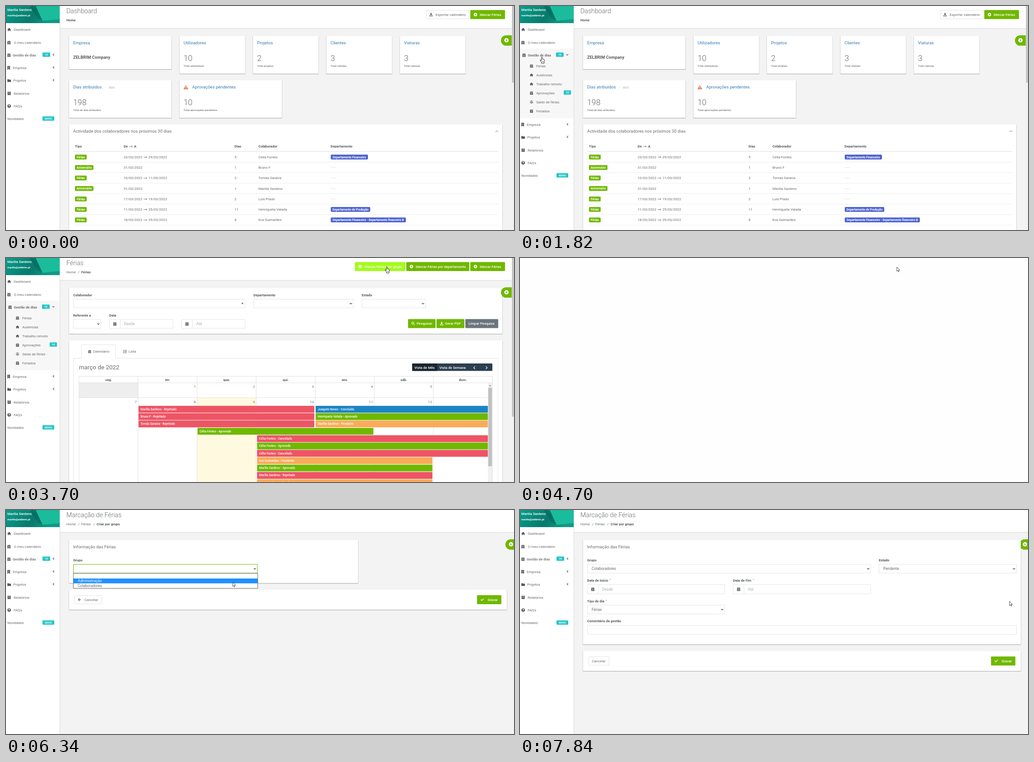
An HTML page for the animation above (8 s loop, 1127x497 px).

```html
<!DOCTYPE html>
<html lang="pt">
<head>
<meta charset="utf-8">
<title>Dashboard</title>
<style>
html, body { margin: 0; width: 100%; height: 100%; overflow: hidden; background: #fff; }
svg { display: block; width: 100vw; height: 100vh; font-family: Roboto, sans-serif; }
text { white-space: pre; }
.bare text, .bare .ic { visibility: hidden; }
</style>
</head>
<body>
<svg id="stage" viewBox="0 0 1127 497"></svg>
<script>
const LOOP = 8000;
const GREEN = '#70b800', TEAL = '#23c6c8', GREY = '#676a6c', DARK = '#55585a', LINE = '#e2e4e6';
const RED = '#ed5565', BLUE = '#1c84c6', ORANGE = '#f8ac59', INDIGO = '#4a61cf';
const WHO = {
  me: 'Marília Sardeno', a: 'Célia Fontes', b: 'Bruno F', c: 'Tomás Saraiva',
  d: 'Luís Prado', e: 'Henriqueta Valada', f: 'Eva Guimarães', g: 'Joaquim Neves'
};

const ICONS = {
  home: 'M8 1L0 8l1 1 1-.8V15h4.5v-4h3v4H14V8.2l1 .8 1-1z',
  cal: 'M1 2h3V0h2v2h4V0h2v2h3v3H1zM1 6h14v10H1zM4 8v2h3V8zM9 8v2h3V8zM4 12v2h3v-2zM9 12v2h3v-2z',
  plan: 'M1 2h3V0h2v2h4V0h2v2h3v3H1zM1 6h14v10H1zM4 9v2h8V9z',
  build: 'M2 0h12v16h-4v-3H6v3H2zM5 3v2h2V3zM9 3v2h2V3zM5 7v2h2V7zM9 7v2h2V7z',
  folder: 'M0 2h6l2 2h8v10H0z',
  box: 'M0 1h16v4H0zM1 6h14v9H1zM5.5 8v1.5h5V8z',
  quest: 'M8 0a8 8 0 1 0 .01 0zM7 11h2v2H7zM4.5 6a3.5 3.5 0 1 1 4.5 3.2V10H7V7.5h1A1.3 1.3 0 1 0 6.6 6z',
  plus: 'M8 0a8 8 0 1 0 .01 0zM7 4h2v3h3v2H9v3H7V9H4V7h3z',
  down: 'M6 0h4v6h4l-6 6-6-6h4zM0 12h3l3 2h4l3-2h3v4H0z',
  check: 'M0 8l2-2 4 4 8-8 2 2L6 14z',
  left: 'M8 1l2 2-4 4h10v2H6l4 4-2 2-7-7z',
  search: 'M6 0a6 6 0 1 0 .01 0zM6 2.5a3.5 3.5 0 1 1-.01 0zM10.5 12.5l2-2L16 14l-2 2z',
  list: 'M0 1h3v3H0zM5 2h11v2H5zM0 6.5h3v3H0zM5 7h11v2H5zM0 12h3v3H0zM5 12.5h11v2H5z',
  warn: 'M8 1l8 14H0zM7 5v5h2V5zM7 11.5v2h2v-2z',
  scale: 'M7 1h2v1h5v2H9v9h4v2H3v-2h4V4H2V2h5zM0 11l3-6 3 6zM10 11l3-6 3 6z'
};

const rect = (x, y, x2, y2, fill, more = '') =>
  `<rect x="${x}" y="${y}" width="${x2 - x}" height="${y2 - y}" fill="${fill}" ${more}/>`;
// y is the middle of the capital letters
const text = (x, y, s, size = 7.75, fill = GREY, weight = 400, more = '') =>
  `<text x="${x}" y="${y + size * .36}" font-size="${size}" fill="${fill}" font-weight="${weight}" ${more}>${s}</text>`;
const bold = (x, y, s, size = 7.6) => text(x, y, s, size, DARK, 700);
const mid = 'text-anchor="middle"';
const icon = (name, x, y, size = 8, fill = DARK) =>
  `<path class="ic" d="${ICONS[name]}" fill="${fill}" fill-rule="evenodd" transform="translate(${x - size / 2} ${y - size / 2}) scale(${size / 16})"/>`;
const chevron = (x, y, turn = 0, stroke = DARK, r = 2.3) =>
  `<path class="ic" d="M${-r} ${-r / 2}L0 ${r / 2}L${r} ${-r / 2}" fill="none" stroke="${stroke}" stroke-width="1.2" transform="translate(${x} ${y}) rotate(${turn})"/>`;
const badge = (x, x2, y, s, fill = TEAL, h = 9.6) =>
  `<g class="ic">${rect(x, y - h / 2, x2, y + h / 2, fill, 'rx="1"')}${text((x + x2) / 2, y, s, 5.9, '#fff', 700, mid)}</g>`;
const pill = (x, x2, y, s, fill) =>
  rect(x, y - 5.4, x2, y + 5.4, fill, 'rx="2"') + text((x + x2) / 2, y, s, 6.5, '#fff', 700, mid);
const card = (x, y, x2, y2) =>
  rect(x - .6, y + .5, x2 + .6, y2 + 1.6, '#000', 'opacity=".22" rx="1"') + rect(x, y, x2, y2, '#fff');
const field = (x, y, x2, y2, stroke = LINE) =>
  rect(x + .5, y + .5, x2 - .5, y2 - .5, '#fff', `stroke="${stroke}" stroke-width="1"`);
const select = (x, y, x2, y2, value = '', stroke = LINE) =>
  field(x, y, x2, y2, stroke) + text(x + 10, (y + y2) / 2, value, 8.3) + chevron(x2 - 6, (y + y2) / 2, 0, '#333');
const dateField = (x, y, x2, y2, hint) =>
  field(x, y, x2, y2) + rect(x + 24, y, x + 25, y2, LINE) +
  icon('cal', x + 12.5, (y + y2) / 2, 8) + text(x + 33, (y + y2) / 2, hint, 8.5, '#a9adb0');
const button = (x, x2, y, name, label, tx, fill = GREEN, id = '') =>
  rect(x, y - 10, x2, y + 10, fill, `rx="1.5" ${id}`) +
  (name ? icon(name, x + 11.5, y, 7.6, '#fff') : '') + text(tx, y, label, 7.7, '#fff', 500);
const plain = (x, x2, y, name, label, tx) =>
  rect(x + .5, y - 9.5, x2 - .5, y + 9.5, '#fff', `rx="1.5" stroke="${LINE}"`) +
  (name ? icon(name, x + 11, y, 7.6) : '') + text(tx, y, label);
const arrow = (x, y) =>
  `<path d="M${x} ${y}h7.5M${x + 5} ${y - 2}l2.5 2l-2.5 2" fill="none" stroke="${GREY}" stroke-width=".8"/>`;
const group = (id, body, more = '') => `<g id="${id}" ${more}>${body}</g>`;

function frame(title, right, crumbs) {
  return rect(120, 0, 1127, 497, '#f3f3f3') + rect(120, 0, right, 50.3, '#dedede') +
    rect(120, 0, right, 49, '#fff') + text(134, 11, title, 14.2, GREY, 300) + crumbs;
}
function floating(x, right) {
  const r = 11.5;
  return `<path d="M${right} 65H${x + r}a${r} ${r} 0 0 0 0 ${2 * r}H${right}z" fill="${GREEN}"/>` + icon('plus', x + 12.3, 76, 9.5, '#fff');
}
const pageBar = end => rect(1122, 0, 1127, 497, '#f1f1f1') + rect(1122.6, 0, 1126.6, end, '#c1c1c1');

function dashboard() {
  const stat = (x, title, n, label, w = 145.5, y = 67) =>
    card(x, y, x + w, y + 83) + text(x + 9, y + 15, title, 9.5, '#337ab7') +
    text(x + 9, y + 49, n, 17.8, GREY, 300) + text(x + 9, y + 66.3, label, 5.95, DARK);
  const rows = [
    ['Férias', '23/03/2022', '29/03/2022', 5, WHO.a, 'Departamento Financeiro', 803],
    ['Aniversário', '31/03/2022', '', 1, WHO.b],
    ['Férias', '10/03/2022', '11/03/2022', 2, WHO.c],
    ['Aniversário', '31/03/2022', '', 1, WHO.me],
    ['Férias', '17/03/2022', '19/03/2022', 2, WHO.d],
    ['Férias', '11/03/2022', '25/03/2022', 11, WHO.e, 'Departamento de Produção', 808],
    ['Férias', '18/03/2022', '29/03/2022', 8, WHO.f, 'Departamento Financeiro - Departamento financeiro B', 887]
  ];
  let s = frame('Dashboard', 1122, bold(134, 31.5, 'Home'));
  s += plain(932, 1028, 19, 'down', 'Exportar calendário', 953) + button(1030, 1107, 19, 'plus', 'Marcar Férias', 1051);
  s += card(140, 67, 367, 140) + text(149, 82, 'Empresa', 9.5, '#337ab7') + bold(149, 114, 'ZELBRIM Company', 9.5);
  s += stat(385, 'Utilizadores', 10, 'Total utilizadores') + stat(548, 'Projetos', 2, 'Total projetos') +
    stat(711, 'Clientes', 3, 'Total clientes') + stat(874, 'Viaturas', 3, 'Total viaturas');
  s += stat(140, 'Dias atribuídos', 198, 'Total de dias atribuídos', 227, 165) +
    text(220, 181, '-', 5.9, '#888') + text(228, 181, '2022', 5.9, '#999');
  s += stat(385, '', 10, 'Total aprovações pendentes', 227, 165) +
    icon('warn', 399, 180, 11, '#e0805c') + text(413, 180, 'Aprovações pendentes', 9.5, '#337ab7');
  s += card(140, 263, 1101, 510) + text(149, 278, 'Actividade dos colaboradores nos próximos 30 dias', 9.5) + chevron(1089, 278, 180, '#aaa', 3);
  s += bold(153, 311.5, 'Tipo') + bold(261, 311.5, 'De') + arrow(273, 311.7) + bold(284, 311.5, 'A') +
    bold(507, 311.5, 'Dias') + bold(560, 311.5, 'Colaborador') + bold(720, 311.5, 'Departamento') + rect(149, 322, 1092, 323, '#dcdcdc');
  rows.forEach(([kind, from, to, days, name, dep, end], i) => {
    const y = 335.2 + i * 23.25;
    s += pill(153, kind === 'Férias' ? 179 : 194, y, kind, GREEN) + text(261, y, from) +
      (to ? arrow(305, y + .2) + text(316, y, to) : '') + text(507, y, days) + text(560, y, name) +
      (dep ? pill(720.5, end, y, dep, INDIGO) : text(721, y, '- - -', 7.7, '#999')) +
      rect(149, y + 11, 1092, y + 11.8, '#e7e7e7');
  });
  return s + floating(1098, 1122) + pageBar(170);
}

function calendar() {
  const X = i => 162 + 131 * i;
  const events = [
    [0, 294, 684, RED, WHO.me, 'Rejeitado'], [0, 687, 1069, BLUE, WHO.g, 'Concluído'],
    [1, 294, 684, RED, WHO.b, 'Rejeitado'], [1, 687, 1069, GREEN, WHO.e, 'Aprovado'],
    [2, 294, 684, RED, WHO.c, 'Rejeitado'], [2, 687, 1069, ORANGE, WHO.me, 'Pendente'],
    [3, 425, 815, GREEN, WHO.a, 'Aprovado'], [4, 557, 1069, RED, WHO.a, 'Cancelado'],
    [5, 557, 1069, GREEN, WHO.a, 'Aprovado'], [6, 557, 1069, RED, WHO.a, 'Cancelado'],
    [7, 557, 946, ORANGE, WHO.f, 'Pendente'], [8, 557, 946, GREEN, WHO.me, 'Aprovado'],
    [9, 557, 946, RED, WHO.me, 'Rejeitado'], [10, 557, 946, ORANGE, WHO.g, 'Pendente']
  ];
  let s = rect(149, 222, 1092, 223, LINE) + rect(149, 222, 150, 497, LINE) + rect(1091, 222, 1092, 497, LINE) +
    `<path d="M167.5 223V192.5H242.5V223" fill="#fff" stroke="${LINE}"/>` +
    icon('cal', 185.5, 207.5, 7) + text(192.5, 207.5, 'Calendário') + icon('list', 264, 207.5, 8) + text(272, 207.5, 'Lista');
  s += text(162, 242, 'março de 2022', 13.4);
  s += rect(901, 234, 1079, 250.5, '#2c3e50', 'rx="1.5"') + rect(901, 234, 957, 250.5, '#1a252f', 'rx="1.5"') +
    text(906, 243.5, 'Vista de Mês', 7.75, '#fff', 500) + text(961.5, 243.5, 'Vista de Semana', 7.75, '#fff', 500) +
    chevron(1039, 243.5, 90, '#fff', 3.2) + chevron(1066, 243.5, -90, '#fff', 3.2);
  s += rect(162, 277, 293, 310, '#eee') + rect(424, 310, 555, 497, '#fffadf');
  ['seg.', 'ter.', 'qua.', 'qui.', 'sex.', 'sáb.', 'dom.'].forEach((d, i) => {
    s += text(X(i) + 65.5, 270, d, 7.6, DARK, 700, mid) + rect(X(i) - .4, 262, X(i) + .5, 497, '#ddd');
    if (i && i < 6) s += text(X(i + 1) - 3, 285.5, i, 7.75, GREY, 400, 'text-anchor="end"');
    if (i < 6) s += text(X(i + 1) - 3, 319, 7 + i, 7.75, GREY, 400, 'text-anchor="end"');
  });
  for (const y of [262, 276.5, 309.5]) s += rect(162, y, 1079, y + .9, '#ddd');
  for (const [row, x, x2, fill, name, state] of events) {
    const y = 328 + row * 16.3;
    s += rect(x, y, x2, y + 15.2, fill, 'rx="1"') + text(x + 4.5, y + 7.4, name + ' - ' + state, 6.6, '#fff', 500);
  }
  return s + rect(1069, 277, 1079, 497, '#f1f1f1') + rect(1070, 288, 1078, 462, '#c1c1c1') +
    '<path d="M1071.5 284.5h5l-2.5-3z" fill="#888"/>' + rect(1078.6, 262, 1079.5, 497, '#ddd');
}

function holidays() {
  let s = frame('Férias', 1122, text(134, 31.5, 'Home') + text(160, 31.5, '/') + bold(167, 31.5, 'Férias'));
  s += button(774, 886, 19, 'plus', 'Marcar Férias por grupo', 795.5, GREEN, 'id="groupBtn"') +
    button(888, 1028, 19, 'plus', 'Marcar Férias por departamento', 909) + button(1030, 1107, 19, 'plus', 'Marcar Férias', 1051);
  s += card(140, 67, 1101, 168) + bold(149, 82, 'Colaborador') + bold(549, 82, 'Departamento') + bold(789, 82, 'Estado') +
    field(149, 91, 531, 111) + '<path d="M522 99.5h5l-2.5 3.4z" fill="#666"/>' + select(549, 91, 771, 111) + select(789, 91, 931, 111);
  s += bold(149, 127, 'Referente a') + bold(229, 127, 'Data') + select(149, 136, 211, 156.5) +
    dateField(229, 136, 371, 156.5, 'Desde') + dateField(389, 136, 531, 156.5, 'Até');
  s += button(892, 953, 145.5, 'search', 'Pesquisar', 911) + button(955, 1017, 145.5, 'down', 'Gerar PDF', 974) +
    button(1019, 1092, 145.5, '', 'Limpar Pesquisa', 1026, '#6c757d');
  return s + card(140, 183, 1101, 510) + group('cal', calendar()) + floating(1098, 1122) + pageBar(352);
}

const formFrame = () => frame('Marcação de Férias', 1127,
  text(134, 31.5, 'Home') + text(160, 31.5, '/') + text(167, 31.5, 'Férias') + text(193.5, 31.5, '/') + bold(201, 31.5, 'Criar por grupo')) + floating(1108, 1127);
const save = y => button(1045, 1099, y, 'check', 'Gravar', 1068.5);
const formHead = () => text(149, 82, 'Informação das Férias', 9.5) + bold(149, 111.5, 'Grupo');

function shortForm() {
  const options = rect(149.5, 140.5, 558.5, 173.8, '#fff', 'stroke="#666"') + rect(150, 152, 558, 162.7, '#1e90ff', 'id="mark"') +
    text(159, 157, 'Administração', 8.3, '#fff', 400, 'id="opt0"') + text(159, 168, 'Colaboradores', 8.3, GREY, 400, 'id="opt1"');
  return formFrame() + card(140, 67, 781, 162) + formHead() +
    group('closed', select(149, 120, 558, 140.5)) + group('focused', select(149, 120, 558, 140.5, '', GREEN)) +
    group('chosen', text(159, 130.3, 'Colaboradores', 8.3)) +
    card(140, 177, 1111, 221) + plain(152, 213, 199, 'left', 'Cancelar', 174) + save(199) + group('options', options);
}

function longForm() {
  const must = (x, y, s, star) => bold(x, y, s) + text(star, y - 1, '*', 6, RED);
  return formFrame() + card(140, 67, 1111, 298) + formHead() + select(149, 120, 778.5, 140.5, 'Colaboradores') +
    bold(796, 111.5, 'Estado') + select(796, 120, 1102, 140.5, 'Pendente') +
    must(149, 156, 'Data de Início', 199) + dateField(149, 165, 454.5, 186.5, 'Desde') +
    must(472.5, 156, 'Data de Fim', 516.5) + dateField(472.5, 165, 778.5, 186.5, 'Até') +
    must(149, 202, 'Tipo de dia', 190.5) + select(149, 210.5, 454.5, 231, 'Férias') +
    bold(149, 246.5, 'Comentário da gestão') + field(149, 255.5, 1102, 276.5) +
    card(140, 313, 1111, 357) + plain(152, 198, 335, '', 'Cancelar', 159.5) + save(335);
}

function sidebar() {
  const item = (name, x, y, tx, label) => icon(name, x, y, 8) + text(tx, y, label);
  const head = rect(0, 0, 119, 38, 'url(#teal)') + '<path d="M66 0h53v29l-38 4z" fill="#1abc9c"/>' +
    '<path d="M66 0l15 33-10-5L52 0z" fill="#00584f" opacity=".35"/>' +
    text(3, 8, WHO.me, 7.7, '#fff', 500) + text(3, 20.5, 'marilia@zelbrim.pt', 5.95, '#fff', 700);
  const subs = [['cal', 'Férias'], ['home', 'Ausências'], ['home', 'Trabalho remoto'], ['plan', 'Aprovações'], ['scale', 'Saldo de férias'], ['plan', 'Feriados']]
    .map(([name, label], i) => icon(name, 25.5, 133 + 20 * i, 7.6) + text(36, 133 + 20 * i, label)).join('') + badge(97, 113, 192, '10');
  return rect(0, 0, 119, 497, '#fff') + rect(119, 0, 120, 497, '#dadada') + head +
    item('home', 7, 52, 17, 'Dashboard') + item('cal', 6.5, 81, 17.5, 'O meu calendário') +
    rect(0, 95, 119, 123, '#f7f7f7', 'id="daysBg"') +
    group('days', icon('cal', 6.5, 109, 8) + text(15, 109, 'Gestão de dias', 7.75, GREY, 500, 'id="daysText"')) +
    group('daysBadge', badge(81, 98, 108, '10')) + group('shut', chevron(105.5, 108, 90)) + group('down', chevron(105, 108)) +
    group('sub', rect(0, 123, 119, 249, '#f7f7f7') + subs, 'clip-path="url(#fold)"') +
    group('low', rect(0, 123.5, 119, 151.5, GREEN, 'id="firmBg"') + item('build', 6, 137, 15, 'Empresa') + chevron(105.5, 136.5, 90) +
      item('folder', 7, 165.5, 16, 'Projetos') + chevron(105.5, 164.5, 90) + item('box', 7, 194, 17, 'Relatórios') + icon('quest', 7, 222, 8) +
      group('tail', text(17, 222, 'FAQ\'s') + text(3, 250.5, 'Novidades') + badge(81, 107, 249.7, 'NOVO')));
}

const pointer = '<path d="M0 0V9.4L2.2 7.5L3.7 10.8L5 10.2L3.6 7H6.5z" fill="#fff" stroke="#222" stroke-width=".8"/>';
const hand = '<path d="M-1.2 .8Q0 -.6 1.1 .8V4.6L4.6 5.4Q6 5.8 5.8 7.4L5 11V13.8H-1V11.6L-4 7.8Q-4.2 6.4 -2.8 6.6L-1.2 8z" fill="#fff" stroke="#111" stroke-width=".9"/>' +
  '<path d="M1 11.5V8.8M3 11.5V8.8" stroke="#111" stroke-width=".6"/>';

const stage = document.getElementById('stage');
stage.innerHTML = '<defs><linearGradient id="teal" x2="1" y2=".25"><stop stop-color="#0a9d8c"/><stop offset=".6" stop-color="#087a6d"/><stop offset="1" stop-color="#129a85"/></linearGradient>' +
  '<clipPath id="fold"><rect id="foldBox" x="0" y="123" width="119" height="0"/></clipPath></defs>' +
  rect(0, 0, 1127, 497, '#fefefe') +
  group('dash', dashboard()) + group('hol', holidays()) + group('form', shortForm()) + group('full', longForm()) +
  group('side', sidebar()) + group('cursor', group('pointer', pointer) + group('hand', hand));

const el = id => document.getElementById(id);
const show = (id, on) => el(id).setAttribute('display', on ? 'inline' : 'none');
const set = (id, key, value) => el(id).setAttribute(key, value);
const clamp = v => Math.max(0, Math.min(1, v));
const smooth = v => v * v * (3 - 2 * v);

// time, x, y of the cursor tip
const PATH = [
  [120, 1085, 474], [650, 48, 110], [1780, 48, 110], [1890, 50, 120], [2400, 50, 120], [2440, 51, 126],
  [2980, 51, 126], [3640, 846, 19], [3700, 845, 19.5], [3760, 815, 20], [3800, 815, 20], [3990, 836, 20],
  [5440, 836, 20], [5940, 499, 132], [6140, 499, 132], [6240, 503, 163], [6300, 503, 163], [6340, 503, 160],
  [6700, 503, 160], [6820, 503, 165], [7340, 503, 165], [7840, 1086, 202.5]
];
function cursorAt(t) {
  let i = 0;
  while (i < PATH.length - 2 && t > PATH[i + 1][0]) i++;
  const [t0, x0, y0] = PATH[i], [t1, x1, y1] = PATH[i + 1];
  const k = smooth(clamp((t - t0) / (t1 - t0)));
  return [x0 + (x1 - x0) * k, y0 + (y1 - y0) * k];
}

function buttonColor(t) {
  if (t < 3600) return GREEN;
  const k = smooth(clamp((t - 4130) / 260));
  const mix = (a, b) => Math.round(a + (b - a) * k);
  return `rgb(${mix(163, 112)},${mix(251, 184)},${mix(31, 0)})`;
}

function draw(t) {
  const within = (a, b) => t >= a && t < b;
  show('dash', t < 2440);
  show('hol', within(2690, 4620));
  show('cal', t >= 2980);
  show('form', within(4770, 7340));
  show('full', t >= 7340);
  show('side', !within(2440, 2610) && !within(4620, 4770));
  stage.setAttribute('class', within(4770, 5020) ? 'bare' : '');

  const opened = within(970, 2440) || within(2690, 4620);
  const slide = t < 2440 ? 1 - Math.pow(1 - clamp((t - 870) / 350), 1.45) : 1;
  const fold = opened ? 126 * slide : 0;
  const over = within(600, 1820);
  set('foldBox', 'height', fold);
  set('low', 'transform', `translate(0 ${fold})`);
  show('daysBg', opened || over);
  set('daysBg', 'fill', over ? GREEN : '#f7f7f7');
  set('daysText', 'fill', over ? '#47730a' : opened ? DARK : GREY);
  set('days', 'transform', `translate(${opened ? 2.4 : 0} 0)`);
  set('daysBadge', 'transform', `translate(${opened ? -1.2 : 0} 0)`);
  show('shut', !opened);
  show('down', opened);
  show('firmBg', within(2610, 2690));
  show('tail', !within(2610, 2690));

  set('groupBtn', 'fill', buttonColor(t));

  const list = within(6020, 7040), low = !within(6340, 6780);
  show('closed', t < 6020);
  show('focused', t >= 6020);
  show('options', list);
  show('mark', t >= 6200);
  set('mark', 'y', low ? 162.7 : 152);
  set('opt0', 'fill', low ? GREY : '#fff');
  set('opt1', 'fill', low && t >= 6200 ? '#fff' : GREY);
  show('chosen', t >= 7040);

  const [x, y] = cursorAt(t);
  const link = within(590, 2440) || within(2610, 3060) || within(3560, 4620);
  show('cursor', t >= 120);
  show('hand', link);
  show('pointer', !link);
  set('cursor', 'transform', `translate(${x} ${y})`);
}

function tick() {
  draw(performance.now() % LOOP);
  requestAnimationFrame(tick);
}
tick();
</script>
</body>
</html>
```
